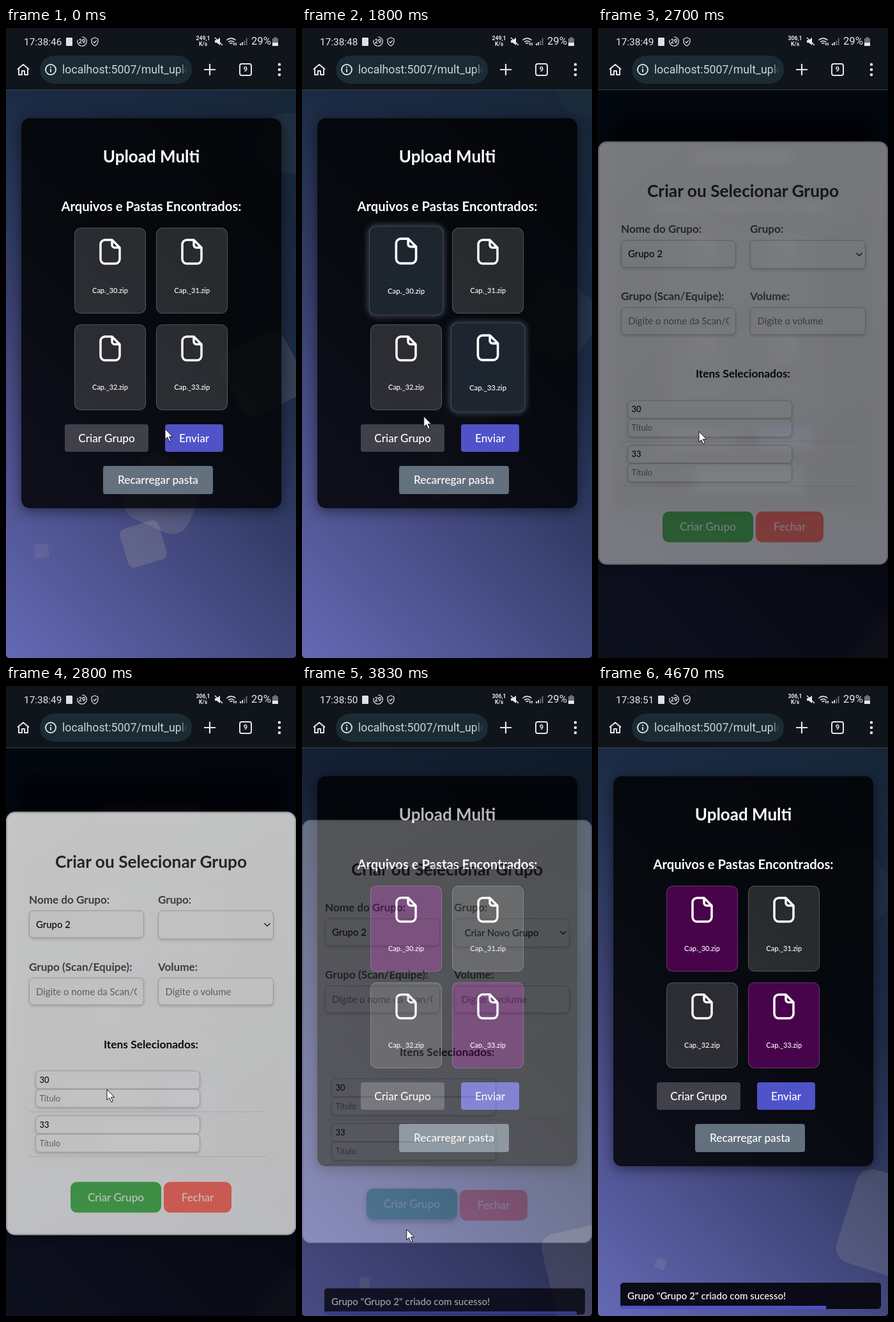
Recreate the animation shown at these times as an HTML page with a canvas. Size 454x984 px, loop 4.7 s.

```html
<!DOCTYPE html>
<html lang="pt-BR">
<head>
<meta charset="utf-8">
<title>Upload Multi</title>
<style>
html, body { margin: 0; width: 100%; height: 100%; overflow: hidden; background: #000; }
#stage { position: absolute; left: 0; top: 0; width: 454px; height: 984px; overflow: hidden; border-radius: 0 0 5px 5px;
  font-family: Lato, "Open Sans", sans-serif; color: #fff; }
#stage div, #stage svg, canvas { position: absolute; box-sizing: border-box; white-space: pre; }
.mid { text-align: center; }
.panel { background: rgba(0,0,0,.82); border-radius: 13px; box-shadow: 0 4px 20px rgba(0,0,0,.5); }
.h1 { font-size: 26px; font-weight: 700; }
.h2 { font-size: 20.3px; font-weight: 700; }
.h3 { font-size: 17.4px; font-weight: 700; color: #0c0c0c; }
.card { border-radius: 10px; }
.name { font-size: 11px; font-weight: 500; }
.btn { border-radius: 4px; font-size: 17.2px; font-weight: 500; text-align: center; }
.big { border-radius: 10px; font-size: 17.1px; }
.label { font-size: 17.1px; font-weight: 700; color: #4b4b4b; }
.field { border: 1px solid #bdbdbd; border-radius: 7px; background: #f0f0f0; box-shadow: 0 2px 4px rgba(0,0,0,.16); }
.value { font-size: 14.9px; color: #0a0a0a; font-weight: 500; overflow: hidden; }
.small { font-size: 13px; }
.hint { color: #757575; font-weight: 400; }
.rule { background: #d0d0d0; }
#overlay { background: rgba(0,3,8,.87); }
#modal { background: linear-gradient(145deg, #f5f5f5, #e8e8e8); border-radius: 14px;
  box-shadow: inset 0 0 0 2px #c3c3c3, 0 4px 14px rgba(0,0,0,.4); }
#toast { background: rgba(7,8,16,.95); border-radius: 5px; overflow: hidden; }
.bar { background: #10151b; border-bottom: 1px solid #3a4047; }
.pill { background: #1a2b33; border-radius: 22px; }
.sys { font-family: Roboto, sans-serif; color: #e6e8ea; }
</style>
</head>
<body>
<div id="stage"></div>
<script>
const LOOP = 4700;
const stage = document.getElementById('stage');

function put(parent, cls, x, y, w, h, text = '', css = '') {
  const el = document.createElement('div');
  el.className = cls;
  el.style.cssText = `left:${x}px;top:${y}px;width:${w}px;height:${h}px;line-height:${h}px;${css}`;
  el.textContent = text;
  parent.appendChild(el);
  return el;
}
function icon(parent, x, y, w, h, body, color = '#fff', width = 2) {
  const holder = put(parent, '', x, y, w, h);
  holder.innerHTML = `<svg width="${w}" height="${h}" viewBox="0 0 ${w} ${h}" fill="none" stroke="${color}" ` +
    `stroke-width="${width}" stroke-linejoin="round" overflow="visible">${body}</svg>`;
  return holder;
}
const clamp = v => Math.max(0, Math.min(1, v));
const ramp = (t, a, b) => clamp((t - a) / (b - a));
const mix = (a, b, u) => a + (b - a) * u;
const easeOut = u => 1 - Math.pow(1 - u, 2.3);
const smooth = u => u * u * (3 - 2 * u);

// Backdrop
const canvas = document.createElement('canvas');
canvas.width = 454;
canvas.height = 984;
stage.appendChild(canvas);
const ctx = canvas.getContext('2d');
// 45 degree axis through the page area below the browser bar
const sky = ctx.createLinearGradient(-108, 875.5, 562, 205.5);
[[0, '#6569b5'], [.34, '#42487d'], [.66, '#1c2b45'], [1, '#172637']].forEach(([p, c]) => sky.addColorStop(p, c));

const floaters = [
  { x: 215, y: 806, rise: 60, size: 63, turn: -17, spin: 36, alpha: .2, round: .16 },
  { x: 56, y: 817, rise: 92, size: 22, turn: -8, spin: 65, alpha: .12, round: .14 },
  { x: 247, y: 728, rise: 60, size: 108, turn: 24, spin: 36, alpha: .17, round: .25 },
  { x: 402, y: 540, rise: 47, size: 112, turn: -28, spin: 36, alpha: .15, round: .24 },
  { x: 445, y: 180, rise: 50, size: 94, turn: 10, spin: 36, alpha: .05, round: .45 },
  { x: 462, y: 1255, rise: 88, size: 152, turn: -155, spin: 37, alpha: .4, round: .02 },
  { x: 98, y: 1066, rise: 35, size: 16, turn: -87, spin: 24, alpha: .38, round: .02 }
];

function drawBackdrop(t) {
  ctx.fillStyle = sky;
  ctx.fillRect(0, 97, 454, 887);
  for (const f of floaters) {
    const alpha = Math.max(.03, f.alpha - .05 * t);
    const radius = f.size * Math.min(.5, f.round + .03 * t);
    ctx.save();
    ctx.translate(f.x, f.y - f.rise * t);
    ctx.rotate((f.turn + f.spin * t) * Math.PI / 180);
    ctx.fillStyle = `rgba(188,183,155,${alpha})`;
    ctx.beginPath();
    ctx.roundRect(-f.size / 2, -f.size / 2, f.size, f.size, radius);
    ctx.fill();
    ctx.restore();
  }
}

// Upload page
put(stage, 'panel', 24, 141, 407, 609);
put(stage, 'mid h1', 24, 182, 407, 36, 'Upload Multi');
put(stage, 'mid h2', 24, 262, 407, 32, 'Arquivos e Pastas Encontrados:');

const FILE = '<path d="M20 2H9a7 7 0 0 0-7 7v23a7 7 0 0 0 7 7h16a7 7 0 0 0 7-7V14zM20 2v8a4 4 0 0 0 4 4h8"/>';
const cards = [30, 31, 32, 33].map((n, i) => {
  const card = put(stage, 'card', 107 + 128.3 * (i % 2), 312 + 151 * (i >> 1), 112, 134);
  icon(card, 39, 17, 34, 41, FILE, '#fff', 3.5);
  put(card, 'mid name', 0, 88, 112, 20, `Cap._${n}.zip`);
  return card;
});

const IDLE = [255, 255, 255, .14], PICKED = [30, 39, 49, .97], GROUPED = [71, 4, 75, 1];

function paintCard(card, picked, grouped) {
  const rgba = IDLE.map((v, i) => mix(mix(v, PICKED[i], picked), GROUPED[i], grouped));
  const lift = picked * (1 - grouped);
  card.style.background = `rgba(${rgba.join(',')})`;
  card.style.transform = `scale(${1 + .04 * lift})`;
  card.style.boxShadow = `inset 0 0 0 1px rgba(255,255,255,.2), 0 0 10px rgba(200,215,230,${.4 * lift})`;
}

put(stage, 'btn', 92, 619, 131, 43, 'Criar Grupo', 'background:#3f4049');
put(stage, 'btn', 249, 619, 91, 43, 'Enviar', 'background:#5052c8');
put(stage, 'btn', 152, 684, 172, 44, 'Recarregar pasta', 'background:#62717d');

const toast = put(stage, '', 35, 932, 408, 41);
toast.id = 'toast';
put(toast, '', 11, 0, 380, 40, 'Grupo "Grupo 2" criado com sucesso!', 'font-size:15.1px;font-weight:500');
const progress = put(toast, '', 0, 36, 408, 5, '', 'background:#4e50c6');

// Dialog; coordinates are relative to its top edge
const overlay = put(stage, '', 0, 97, 454, 887);
overlay.id = 'overlay';
const modal = put(overlay, '', 0, 112, 454, 661);
modal.id = 'modal';

function field(x, y, w, h, text, kind = '') {
  put(modal, 'field', x, y, w, h);
  const pad = h > 35 ? 11.5 : 6.5;
  return put(modal, 'value ' + kind, x + pad, y, w - 2 * pad, h, text);
}
put(modal, 'mid h1', 0, 58, 454, 38, 'Criar ou Selecionar Grupo', 'color:#2d2d2f;font-size:26.3px');
put(modal, 'label', 36, 126, 180, 22, 'Nome do Grupo:');
put(modal, 'label', 238, 126, 180, 22, 'Grupo:');
put(modal, 'label', 36, 230.5, 190, 22, 'Grupo (Scan/Equipe):');
put(modal, 'label', 238, 230.5, 180, 22, 'Volume:');
field(35.5, 154, 180.5, 43, 'Grupo 2');
const choice = field(238, 154, 181, 45, '');
choice.style.paddingLeft = '5px';
icon(modal, 404, 173, 10, 7, '<path d="M.5 1l4.5 4.5L9.5 1"/>', '#222', 1.4);
field(35.5, 259, 180.5, 43, 'Digite o nome da Scan/Grupo', 'hint');
field(238, 259, 181, 43, 'Digite o volume', 'hint');
put(modal, 'mid h3', 0, 352, 454, 22, 'Itens Selecionados:');
[30, 33].forEach((n, i) => {
  const y = 403.5 + 70 * i;
  field(46, y, 258, 29, String(n), 'small');
  field(46, y + 29, 258, 29, 'Título', 'small hint');
  put(modal, 'rule', 35, y + 64, 373, 1);
});
const create = put(modal, 'btn big', 101, 578, 142, 48, 'Criar Grupo');
put(modal, 'btn big', 247, 578, 106, 48, 'Fechar', 'background:#f96e62;color:#fbe6e3');

const tap = put(stage, '', 92, 619, 131, 43, '', 'background:rgba(46,94,118,.94)');

// Phone and browser bars
put(stage, 'bar', 0, 0, 454, 97);
const clock = put(stage, 'sys', 28, 12, 70, 20, '', 'font-size:15.4px');
put(stage, '', 94, 15, 10, 13, '', 'background:#dfe2e4;border-radius:1px');
icon(stage, 111, 13, 16, 16, '<path d="M8 .8a7.2 7.2 0 1 1-6.8 5"/>', '#dfe2e4', 1.3);
put(stage, 'sys mid', 111, 13, 16, 16, '29', 'font-size:9px;font-weight:700');
icon(stage, 133, 14, 12, 15, '<path d="M6 1l5 2v4c0 3.5-2 5.5-5 7-3-1.5-5-3.5-5-7V3zM3.6 7.2l1.9 1.9 3.2-3.6"/>', '#dfe2e4', 1.3);
const speed = put(stage, 'sys mid', 294, 12, 29, 9, '', 'font-size:8.7px;font-weight:700');
put(stage, 'sys mid', 294, 21, 29, 9, 'K/s', 'font-size:8.7px;font-weight:700');
icon(stage, 326, 14, 14, 14, '<path d="M1 5h3l5-4v12L4 9H1z" fill="#e6e8ea" stroke="none"/><path d="M1 1l12 12"/>', '#e6e8ea', 1.5);
icon(stage, 345, 14, 16, 14, '<path d="M.5 5a10 10 0 0 1 14 0M3 8a6.5 6.5 0 0 1 9 0M5.3 10.5a3.3 3.3 0 0 1 4.4 0M12 13V9M15 9v4"/>', '#e6e8ea', 1.6);
icon(stage, 366, 15, 13, 12, '<path d="M1 12V9M4 12V7"/><path d="M7.3 12V5M10.6 12V1" stroke="#6e7479"/>', '#e6e8ea', 1.8);
put(stage, 'sys', 384, 11, 34, 20, '29%', 'font-size:16.6px');
icon(stage, 417, 14, 9, 14, '<path d="M3 0h3v2h3v12H0V2h3z" fill="#6d7378"/><path d="M0 9h9v5H0z" fill="#e6e8ea"/>', 'none', 0);

icon(stage, 17, 55, 20, 20, '<path d="M3 8v10h5v-6h4v6h5V8l-7-6zM1 9.5L10 2l9 7.5"/>', '#e2e5e7', 2);
put(stage, 'pill', 53, 43, 238, 44);
icon(stage, 61, 56, 18, 18, '<circle cx="9" cy="9" r="8"/><path d="M9 8v5M9 4.5v2"/>', '#d9dee0', 2);
put(stage, 'sys', 88, 52, 195, 26, 'localhost:5007/mult_upload', 'font-size:17.7px;overflow:hidden;color:#cbd3d6;' +
  '-webkit-mask-image:linear-gradient(90deg,#000 94%,transparent)');
icon(stage, 310, 56, 18, 18, '<path d="M9 0v18M0 9h18"/>', '#e2e5e7', 2.2);
icon(stage, 365, 55, 20, 20, '<rect x="1" y="1" width="18" height="18" rx="3"/>', '#e2e5e7', 2);
put(stage, 'sys mid', 365, 55, 20, 20, '9', 'font-size:11px;font-weight:700');
icon(stage, 425, 54, 6, 22, [3, 11, 19].map(y => `<circle cx="3" cy="${y}" r="2.3" fill="#e6e8ea"/>`).join(''), 'none', 0);

const cursor = icon(stage, 0, 0, 13, 21,
  '<path d="M0 0v16.5l3.8-3.4 2.9 6.8 2.7-1.2-2.9-6.4h5.2z" fill="#fff"/>', '#111', 1);

// time, x, y of the pointer tip
const path = [
  [0, 249, 626], [.1, 249, 626], [.4, 172, 405], [.62, 172, 405], [.8, 247, 488], [1.05, 290, 535],
  [1.35, 290, 535], [1.95, 158, 630], [3.42, 158, 630], [3.62, 186, 817], [3.7, 186, 817],
  [3.83, 164, 848], [4.1, 112, 1000], [4.7, 112, 1000]
];
function pointer(t) {
  const i = Math.max(1, path.findIndex(p => p[0] >= t));
  const [a, b] = [path[i - 1], path[i]];
  const u = ramp(t, a[0], b[0]);
  return [mix(a[1], b[1], u), mix(a[2], b[2], u)];
}

function render(t) {
  drawBackdrop(t);
  clock.textContent = '17:38:' + (46 + Math.floor(t + .52));
  speed.textContent = t < 2.47 ? '249,1' : '306,1';

  const grouped = smooth(ramp(t, 3.6, 3.88));
  paintCard(cards[0], smooth(ramp(t, .5, .72)), grouped);
  paintCard(cards[1], 0, 0);
  paintCard(cards[2], 0, 0);
  paintCard(cards[3], smooth(ramp(t, 1.15, 1.37)), grouped);

  const closing = ramp(t, 3.65, 3.917);
  const shown = ramp(t, 2.25, 2.53) * (1 - closing);
  overlay.style.opacity = shown;
  overlay.style.visibility = shown > 0 ? 'visible' : 'hidden';
  overlay.style.backdropFilter = closing > 0 ? 'none' : 'blur(8px)';
  const open = easeOut(ramp(t, 2.6, 3));
  modal.style.opacity = open;
  modal.style.transform = `translateY(${-62 * (1 - open)}px)`;
  choice.textContent = t < 2.95 ? '' : 'Criar Novo Grupo';

  const press = ramp(t, 3.55, 3.66);
  create.style.background = press > 0 ? '#45ab84' : '#4caf50';
  create.style.color = press > 0 ? '#c9e9dc' : '#e6f3e6';
  create.style.transform = `translateY(${-2 * press}px)`;
  create.style.boxShadow = `0 4px 8px rgba(0,0,0,${.35 * press})`;
  tap.style.visibility = t > 2.05 && t < 2.66 ? 'visible' : 'hidden';

  const slide = ramp(t, 3.62, 4.02);
  toast.style.opacity = easeOut(slide);
  toast.style.transform = `translateY(${27 * Math.pow(1 - slide, 1.5)}px)`;
  progress.style.width = 408 * (1 - ramp(t, 3.68, 8.38)) + 'px';

  const [x, y] = pointer(t);
  cursor.style.transform = `translate(${x}px,${y}px)`;
}

const start = performance.now();
function tick() {
  render(((performance.now() - start) % LOOP) / 1000);
  requestAnimationFrame(tick);
}
tick();
</script>
</body>
</html>
```
